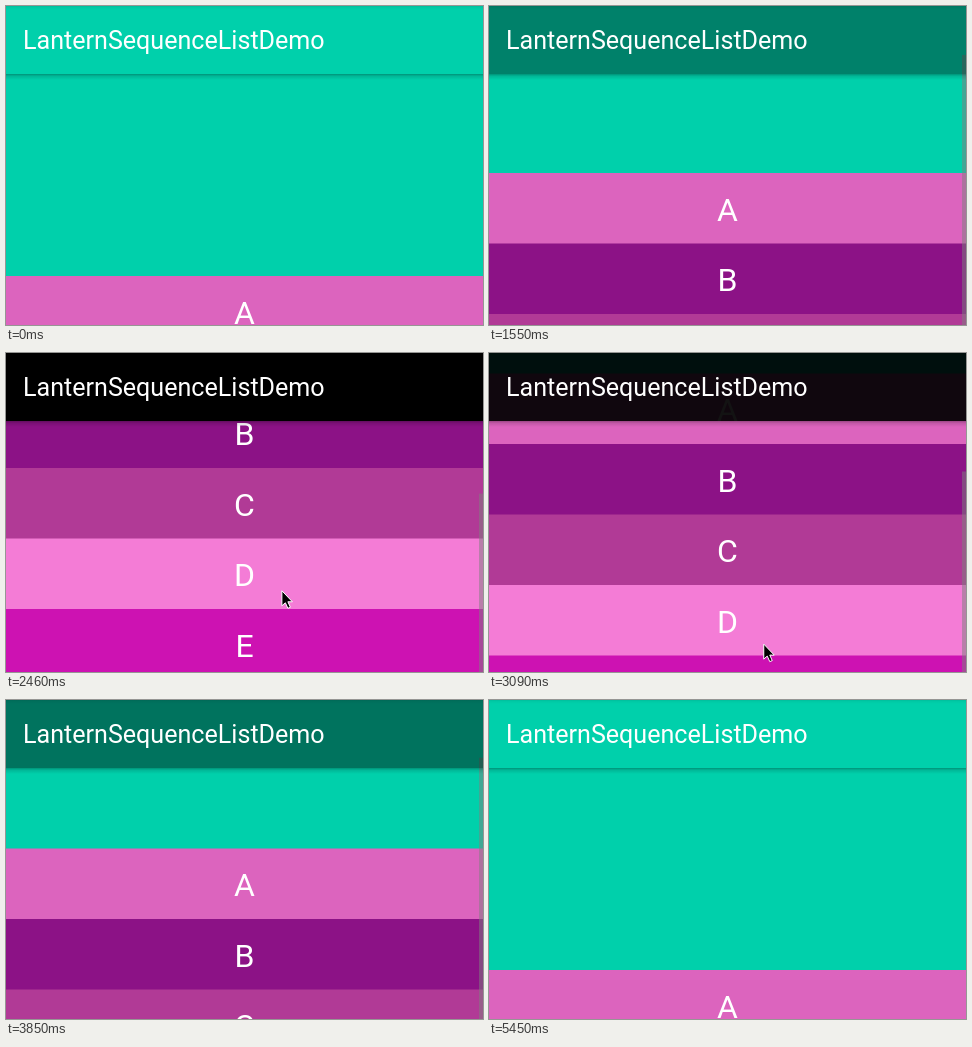
These frames come from a looping animation (477 px wide and 319 px high, 5.57 s). An HTML page:

```html
<!DOCTYPE html>
<html lang="en">
<head>
<meta charset="utf-8">
<title>Fading toolbar</title>
<style>
  html, body { margin: 0; width: 100%; height: 100%; overflow: hidden; background: #00d0ab; }
  svg { display: block; width: 477px; height: 319px; }
  text { font-family: Roboto, sans-serif; fill: #fff; }
  .letter { font-size: 32px; text-anchor: middle; }
  .title { font-size: 25.1px; }
</style>
</head>
<body>
<svg viewBox="0 0 477 319">
  <defs>
    <linearGradient id="fade" x2="0" y2="1">
      <stop offset="0" stop-opacity=".3"/>
      <stop offset=".35" stop-opacity=".12"/>
      <stop offset="1" stop-opacity="0"/>
    </linearGradient>
  </defs>
  <rect width="477" height="319" fill="#00d0ab"/>
  <g id="list"></g>
  <rect id="thumb" x="473" width="4" height="319" fill="#808080" fill-opacity=".5"/>
  <rect width="477" height="4" fill="url(#fade)" opacity=".3"/>
  <rect y="68" width="477" height="6" fill="url(#fade)"/>
  <rect id="toolbar" width="477" height="68"/>
  <text class="title" x="17" y="43">LanternSequenceListDemo</text>
  <path id="pointer" d="M0 0V15L3.5 12L6 17.5L8.5 16.5L6 11H10.5Z" stroke="#fff" stroke-width="1"/>
</svg>
<script>
const LOOP = 5570;
const HEADER = 270;
const ROW = 70.5;
const ROW_COLORS = ['#dc64be', '#8c1286', '#b13a96', '#f47cd6', '#cd12b2', '#a32a92'];

// Each span between two of these times holds ten scroll steps.
const SPANS = [1380, 1950, 2520, 3090, 3680, 4240, 4800];

// [step, scroll offset]
const SCROLL = [
  [-1, 0], [0, 12], [3, 103], [7, 170], [12, 227.5], [19, 296],
  [24, 313], [30, 249.5], [43, 121.5], [50, 36], [53, 0]
];

const byId = id => document.getElementById(id);
const [list, thumb, toolbar, pointer] = ['list', 'thumb', 'toolbar', 'pointer'].map(byId);

list.innerHTML = ROW_COLORS.map((color, i) => {
  const y = HEADER + i * ROW;
  return `<rect y="${y}" width="477" height="${ROW + 0.5}" fill="${color}"/>
    <text class="letter" x="238.5" y="${y + 47.7}">${String.fromCharCode(65 + i)}</text>`;
}).join('');

function stepAt(time) {
  if (time < SPANS[0]) return -1;
  const span = SPANS.findLastIndex(start => time >= start);
  if (span === SPANS.length - 1) return 60;
  const length = SPANS[span + 1] - SPANS[span];
  return span * 10 + Math.min(9, Math.floor((time - SPANS[span] + 4) / length * 10));
}

function slope(i) {
  const a = SCROLL[Math.max(i - 1, 0)];
  const b = SCROLL[Math.min(i + 1, SCROLL.length - 1)];
  return (b[1] - a[1]) / (b[0] - a[0]);
}

// Cubic Hermite curve through the scroll points.
function offsetAt(step) {
  const i = SCROLL.findIndex(point => point[0] > step) - 1;
  if (i < 0) return 0;
  const [x0, y0] = SCROLL[i];
  const [x1, y1] = SCROLL[i + 1];
  const width = x1 - x0;
  const u = (step - x0) / width;
  const v = 1 - u;
  return y0 * v * v * (1 + 2 * u) + y1 * u * u * (3 - 2 * u)
    + width * u * v * (slope(i) * v - slope(i + 1) * u);
}

function thumbOpacity(time) {
  if (time < SPANS[0]) return 0;
  if (time < 5170) return 1;
  return Math.max(0, 1 - (Math.floor((time - 5170) / 70) + 1) / 5);
}

function draw(time) {
  const step = stepAt(time);
  const offset = offsetAt(step);
  const pointerX = 276 - Math.min(2, Math.abs(step - 20) / 8);
  const pointerY = 522 + 0.62 * step - offset;

  list.setAttribute('transform', `translate(0 ${-offset})`);
  toolbar.setAttribute('opacity', Math.min(1, offset / HEADER));
  thumb.setAttribute('y', offset * 0.475);
  thumb.setAttribute('opacity', thumbOpacity(time));
  pointer.setAttribute('transform', `translate(${pointerX} ${pointerY})`);
}

const start = performance.now();
function tick() {
  draw((performance.now() - start) % LOOP);
  requestAnimationFrame(tick);
}
tick();
</script>
</body>
</html>
```
